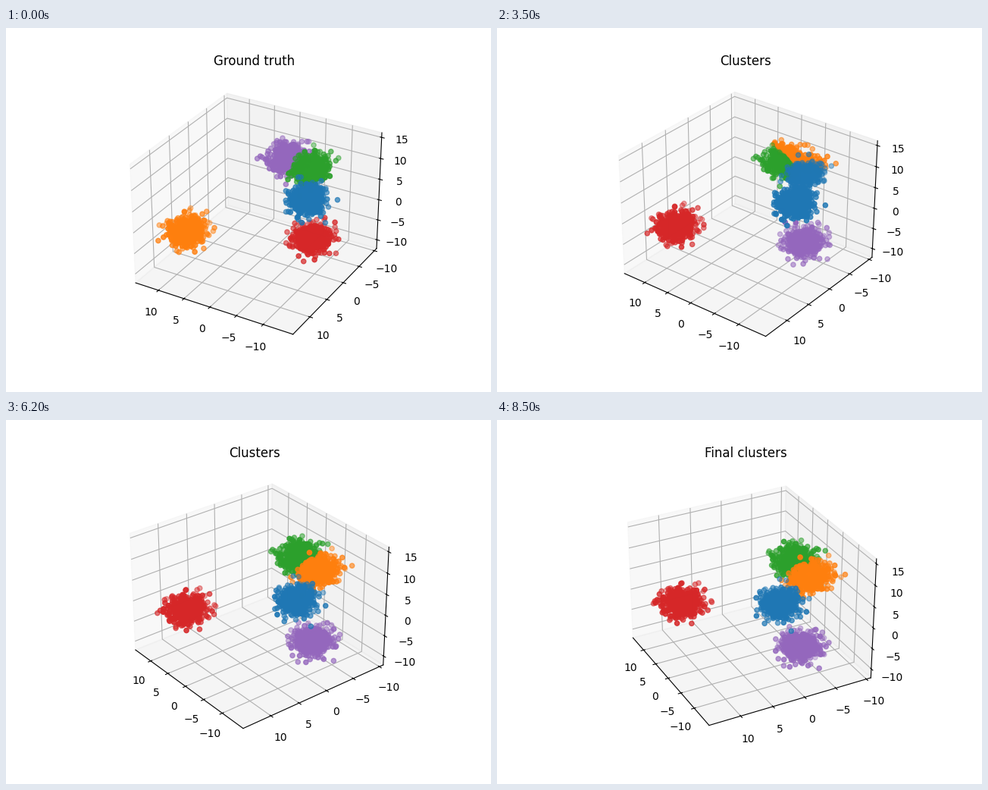
A matplotlib script that plays this animation: 640x480 px, repeating every 9.5 s.

```python
import numpy as np
import matplotlib.pyplot as plt
from matplotlib.animation import FuncAnimation

INTRO, RUN, OUTRO = 20, 65, 10
FRAMES_PER_UPDATE, UPDATES = 5, 8
START_AZIM, AZIM_STEP = 120, 0.5
BLOB_SIZE, BLOB_STD = 450, 1.4

BLUE, ORANGE, GREEN, RED, PURPLE = range(5)
BLOBS = np.array([
    [-9.0, 1.1, 6.4],
    [8.3, 9.2, -1.5],
    [-5.55, -5.4, 8.0],
    [-7.5, -3.0, -6.4],
    [-1.5, -4.8, 9.5],
])
GOALS = BLOBS[[BLUE, GREEN, PURPLE, ORANGE, RED]]

# Data directions that look like right and up in the opening view
RIGHT = np.array([-0.82, -0.57, 0])
UP = np.array([0.28, -0.57, 0.77])


def make_points():
    rng = np.random.RandomState(7)
    truth = np.repeat(np.arange(len(BLOBS)), BLOB_SIZE)
    return BLOBS[truth] + rng.normal(0, BLOB_STD, (truth.size, 3)), truth


def starting_centroids():
    """Four centroids crowd one blob, three of them fanned around purple."""
    starts = GOALS.copy()
    starts[PURPLE] = BLOBS[PURPLE] + [-0.6, 0, -1]
    for label, angle in (BLUE, 60), (ORANGE, 90), (GREEN, 190):
        a = np.radians(angle)
        offset = np.cos(a) * RIGHT + np.sin(a) * UP
        starts[label] = starts[PURPLE] + 4.1 * offset
    return starts


def nearest_centroid(update):
    ease = 1 - (1 - min(update / UPDATES, 1)) ** 2
    progress = np.full((len(GOALS), 1), ease)
    progress[ORANGE] **= 3  # waits until blue has moved away
    centroids = starts + (GOALS - starts) * progress
    gaps = points[:, None] - centroids
    return (gaps ** 2).sum(axis=2).argmin(axis=1)


points, truth = make_points()
starts = starting_centroids()

fig = plt.figure(figsize=(6.4, 4.8), dpi=100)
ax = fig.add_subplot(projection="3d")
ax.set(xlim=(-15.45, 14.55), ylim=(-10.75, 14.8), zlim=(-12.2, 16.1),
       xticks=range(-10, 11, 5), yticks=range(-10, 11, 5),
       zticks=range(-10, 16, 5))


def draw(frame):
    turns = min(max(frame - INTRO + 1, 0), RUN)
    if frame < INTRO:
        title, labels = "Ground truth", truth
    else:
        title = "Clusters" if frame < INTRO + RUN else "Final clusters"
        labels = nearest_centroid((frame - INTRO) // FRAMES_PER_UPDATE)

    for old in list(ax.collections):
        old.remove()
    for k in range(len(BLOBS)):
        ax.scatter(*points[labels == k].T, color=f"C{k}")
    ax.set_title(title)
    ax.view_init(elev=30, azim=START_AZIM + AZIM_STEP * turns)
    return ax.collections


anim = FuncAnimation(fig, draw, frames=INTRO + RUN + OUTRO, interval=100,
                     repeat=True)
plt.show()
```
